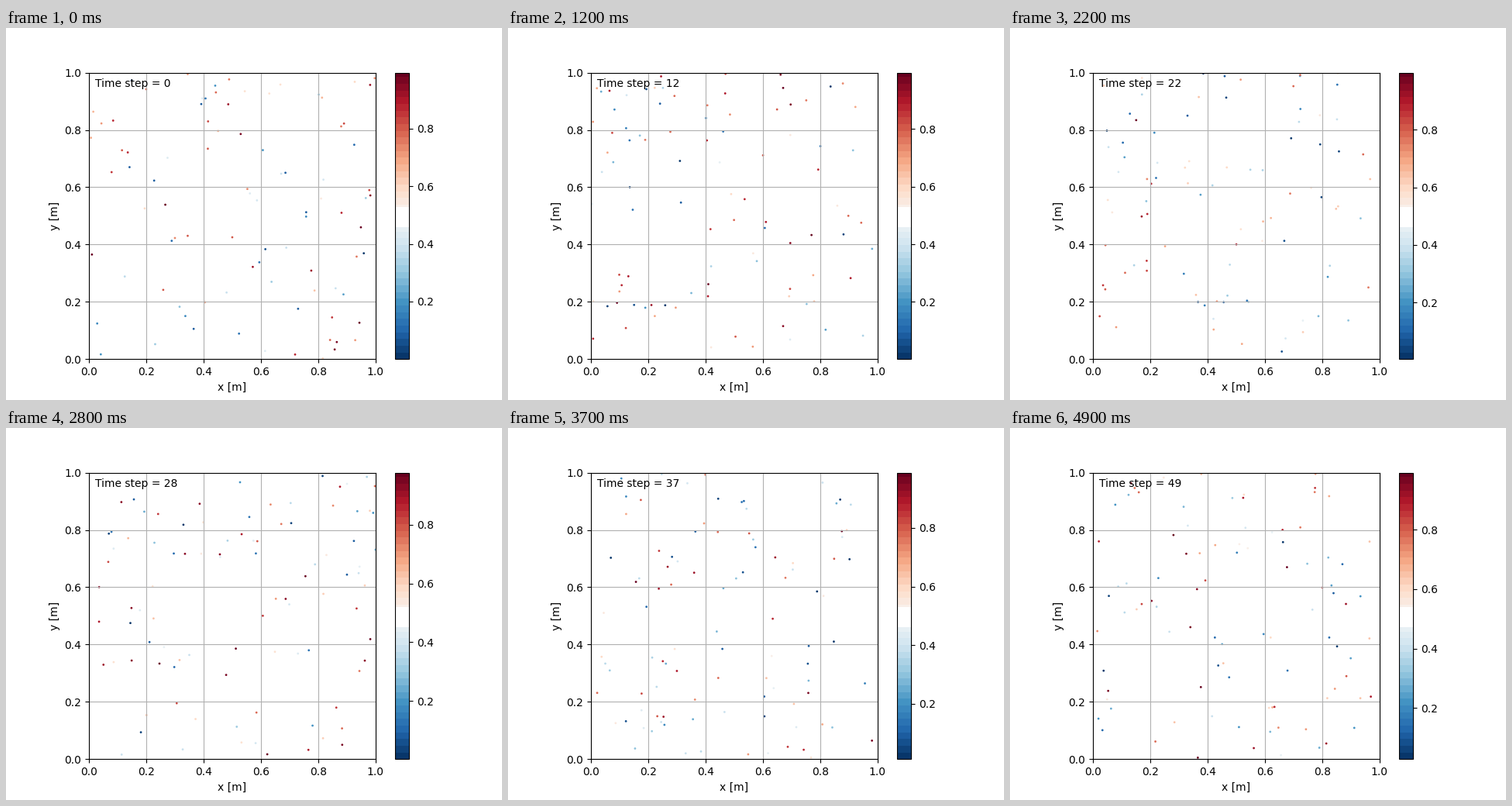
Recreate the animation shown at these times as a matplotlib script. Size 640 by 480 pixels, loop 5 s.

```python
import numpy as np
import matplotlib.pyplot as plt
from matplotlib.animation import FuncAnimation
from matplotlib.colors import ListedColormap

STEPS = 50
INTERVAL = 100
POINTS = 100
BAND = 6
NEAR_WHITE = 0.908


def banded_map():
    """Red-blue map in flat bands whose palest part is pure white."""
    index = np.arange(256)
    red_blue = plt.get_cmap("RdBu_r")
    colors = red_blue(index // BAND * BAND + BAND // 2)
    pale = red_blue(index).min(axis=1) > NEAR_WHITE
    colors[pale] = 1
    return ListedColormap(colors)


def cloud(step):
    """Fresh uniform positions and values for one time step."""
    rng = np.random.default_rng(step)
    return rng.random((POINTS, 2)), rng.random(POINTS)


fig, ax = plt.subplots(figsize=(6.4, 4.8), dpi=100)
positions, values = cloud(0)
dots = ax.scatter(*positions.T, c=values, s=4, linewidths=0, cmap=banded_map())
ax.set(xlim=(0, 1), ylim=(0, 1), xlabel="x [m]", ylabel="y [m]", aspect="equal")
ax.grid(True)
fig.colorbar(dots, ax=ax)
label = ax.text(0.02, 0.95, "")


def update(step):
    positions, values = cloud(step)
    dots.set_offsets(positions)
    dots.set_array(values)
    dots.set_clim(values.min(), values.max())
    label.set_text(f"Time step = {step}")
    return dots, label


animation = FuncAnimation(fig, update, frames=STEPS, interval=INTERVAL,
                          repeat=True, repeat_delay=0, blit=False)
plt.show()
```
